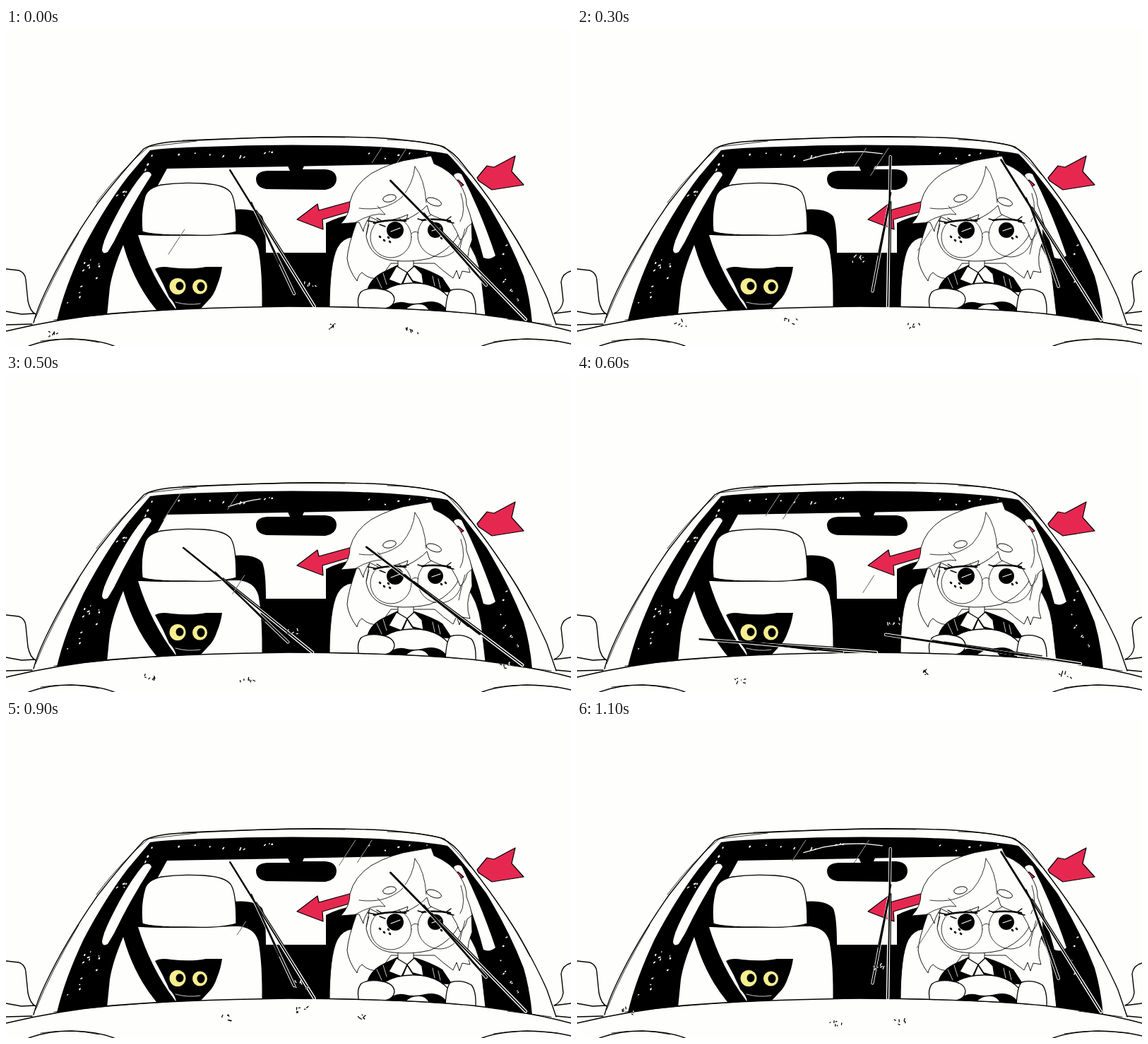
Animation, 800 px wide and 450 px high, one loop 1.2 s. Source, as an HTML page:

```html
<!DOCTYPE html>
<html lang="en">
<head>
<meta charset="utf-8">
<title>Rainy drive</title>
<style>
  html, body { margin: 0; width: 100%; height: 100%; overflow: hidden; background: #fefefc; }
  svg { display: block; width: 100vw; height: 100vh; }
  .ink { fill: none; stroke: #000; stroke-width: 1.4; stroke-linecap: round; stroke-linejoin: round; }
  .thin { stroke-width: .8; }
  .paper { fill: #fefefc; }
  .part { fill: #fefefc; stroke: #000; stroke-width: 1.3; stroke-linejoin: round; }
  .fine { stroke-width: .9; }
  .red { fill: #e62850; stroke: #000; stroke-width: 1.2; stroke-linejoin: round; }
  .yellow { fill: #f6ee8f; }
  #wipers { fill: none; stroke-linecap: round; stroke-linejoin: round; }
  #rain { mix-blend-mode: difference; fill: none; stroke: #fefefc; stroke-linecap: round; }
</style>
</head>
<body>
<svg viewBox="0 0 800 450" preserveAspectRatio="none">
  <rect class="paper" width="800" height="450"/>

  <!-- roof and door mirrors -->
  <path class="ink" d="M39 417Q44 398 56 373Q85 312 130 248Q165 203 195 171Q206 164 235 161Q300 157 400 154Q480 153 535 156Q590 160 616 167Q634 175 647 193Q691 248 724 301Q751 348 766 382L779 420"/>
  <path class="ink thin" d="M42 410Q63 357 103 290M128 247Q165 198 202 168L270 160M250 159Q390 153 480 155M540 158Q590 159 621 168L658 208M690 250Q722 296 742 335"/>
  <path class="ink" d="M0 341L18 343Q27 346 28 356L31 386Q34 401 42 405M0 401L22 405 41 404M0 420L37 419M800 344Q788 347 786 359L789 386Q787 399 776 404L800 401M779 419L800 421"/>

  <!-- windshield and rear window -->
  <path d="M72 414Q83 367 110 310Q140 253 172 211L204 173Q230 169 320 167Q400 164 500 167Q580 170 625 178Q638 189 680 245Q713 299 733 351Q742 382 745 417Z"/>
  <path class="paper" d="M228 199L400 196 600 192 600 318 225 318 212 228Z"/>
  <path class="paper" d="M195 205Q204 201 206 208Q176 254 153 302L144 317Q137 321 136 314Q137 303 150 277Q174 229 195 205Z"/>
  <path class="paper" d="M634 208Q639 203 645 207Q672 259 693 322Q685 329 676 325Q664 277 634 208Z"/>
  <path d="M320 257Q354 254 363 267Q368 279 368 318H453V276Q470 267 500 261V400H320Z"/>
  <path d="M398 193L402 202H370Q355 203 354 213Q354 226 369 228L452 229Q468 226 468 213Q467 201 452 200H420L423 193Z"/>

  <!-- arrow -->
  <path class="red" d="M412 271L441 249 443 258 490 245H520V250L448 271 449 285Q430 278 412 271Z"/>
  <path class="red" d="M628 219L640 215 648 222 634 230Z"/>
  <path class="red" d="M667 212L681 195 691 197 721 181 716 203 733 222 688 229 669 216Z"/>

  <!-- passenger seat -->
  <path class="paper" d="M166 307Q151 342 147 367L143 407H220Q183 367 166 307Z"/>
  <path class="part" d="M186 292Q230 295 326 291Q352 292 358 313Q364 346 363 400H241Q204 352 186 292Z"/>
  <path class="part" d="M193 288Q190 261 197 238Q201 226 220 222Q249 218 280 220Q312 222 319 234Q326 246 326 288Q304 295 255 293Q207 293 193 288Z"/>
  <path class="ink thin" d="M181 292L205 291M309 292L340 290 347 296M339 268Q345 277 344 287"/>

  <!-- cat -->
  <path d="M211 341Q219 336 234 339Q264 342 283 338L306 338Q304 352 299 364Q294 379 286 386L274 399H241Q240 390 231 381Q222 360 211 341Z"/>
  <path class="ink thin" style="stroke:#fefefc" d="M240 388Q258 393 275 390"/>
  <circle class="yellow" cx="243" cy="365.5" r="11.5"/>
  <circle class="yellow" cx="274.5" cy="366" r="10.5"/>
  <ellipse cx="246" cy="365" rx="5.5" ry="6"/>
  <ellipse cx="276" cy="366" rx="5.5" ry="6.5"/>

  <!-- driver's seat -->
  <path class="part fine" d="M458 400Q458 333 469 311Q477 297 490 296L650 299Q668 319 673 354L679 407Z"/>

  <!-- driver -->
  <path class="part fine" d="M497 273Q484 309 483 326Q485 342 497 358Q499 349 504 346Q515 357 530 354L545 333H607Q619 344 633 354L638 343 642 355 646 344 657 346Q649 326 660 300L659 274Z"/>
  <path d="M511 371Q516 353 536 344L555 335 579 336Q604 344 618 353L632 374Z"/>
  <path class="part fine" d="M555 325V338L567 348 577 338V325Z"/>
  <path class="part" d="M553 337L542 356 560 363 568 346ZM578 337L568 346 576 358 591 362 589 348Z"/>
  <path class="part" d="M568 347L561 364H579Z"/>
  <path d="M557 325H577V328H557Z"/>
  <path class="ink thin" style="stroke:#fefefc" d="M525 353L532 368M534 347L539 363M604 351L607 365M612 355L615 368"/>
  <path class="part fine" d="M510 295Q516 326 548 329Q574 332 600 326Q641 310 648 270L595 210 520 235Z"/>

  <!-- eyes and glasses -->
  <circle cx="551" cy="286" r="12"/>
  <circle cx="608" cy="286" r="11"/>
  <path class="ink" style="stroke:#fefefc;stroke-width:1.2" d="M545 288L558 283M603 287L615 283"/>
  <circle class="ink thin" cx="545" cy="296" r="29"/>
  <circle class="ink thin" cx="614" cy="293" r="31"/>
  <path class="ink thin" d="M574 291Q579 286 584 290"/>
  <path class="ink" style="stroke-width:2.6" d="M529 295l1 1M535 300l1 1M541 296l1 1M543 302l1 1M616 297l1 1M622 295l1 1"/>

  <!-- hair -->
  <path class="part fine" d="M487 246Q493 222 517 206Q547 189 578 185L602 181 606 192Q630 202 642 220Q653 237 652 250Q658 265 660 276L653 282Q651 294 643 300Q639 288 630 274Q612 270 600 263L596 251Q586 262 567 271L569 264Q549 273 529 274L515 267Q505 283 506 288L500 275 474 277Q487 264 487 246Z"/>
  <path class="ink thin" d="M579 196Q577 220 560 240Q536 260 500 255M579 196Q593 214 595 247M493 276Q521 260 537 264L526 252M644 234Q652 259 643 274M514 278L510 292M650 284Q644 304 641 320"/>
  <ellipse class="part fine" cx="543" cy="241" rx="9.5" ry="5" transform="rotate(-12 543 241)"/>
  <ellipse class="part fine" cx="606" cy="246" rx="11" ry="5" transform="rotate(20 606 246)"/>
  <path class="ink" style="stroke-width:2.6" d="M521 276Q543 270 566 273M589 272Q608 269 629 273"/>
  <path class="ink" d="M524 275L513 273M532 273L525 269M561 272L570 270M590 272L583 270M623 272L630 267M625 274L634 276M537 281L529 278"/>

  <!-- steering wheel and hands -->
  <path class="part" d="M516 397Q528 362 574 361Q620 360 638 398L632 407H516Z"/>
  <path d="M540 398Q548 386 563 388Q577 392 593 388Q615 383 626 401H540Z"/>
  <path class="paper" d="M566 399Q572 391 583 391Q594 390 599 400Z"/>
  <path class="part" d="M501 403Q495 382 503 373Q514 366 533 370Q549 373 550 384Q549 395 535 397L526 403Z"/>
  <path class="part" d="M622 407Q623 376 630 371Q645 367 659 375Q666 384 665 405Z"/>

  <g id="specks" class="paper"></g>

  <!-- hood -->
  <path class="paper" d="M0 429Q75 411 150 404Q250 396 400 394Q570 395 660 404Q745 414 800 429V450H0Z"/>
  <path class="ink" d="M0 429Q75 411 150 404Q250 396 400 394Q570 395 660 404Q745 414 800 429"/>
  <path class="ink thin" d="M68 413Q145 404 230 399M430 394Q565 396 645 403M710 412L772 420"/>
  <path class="ink" d="M32 450Q59 440 93 440Q130 441 153 450M674 450Q698 441 738 440Q777 441 800 447"/>
  <path class="ink thin" d="M49 443Q91 436 132 445M690 444Q730 437 781 443"/>

  <g id="wipers"></g>
  <g id="rain"></g>
</svg>
<script>
const STEP = 100, STEPS = 12, CYCLE = 9;
const byId = id => document.getElementById(id);
const mix = (a, b, t) => a + (b - a) * t;

function seeded(seed) {
  return () => {
    seed = (seed * 16807) % 2147483647;
    return seed / 2147483647;
  };
}

// How far the wipers are raised: quick rise, short hold, accelerating fall, rest
function sweep(beat) {
  const rise = (beat + 1) / 3, fall = (beat - 3) / 3;
  if (rise <= 1) return 1 - (1 - rise) ** 2.4;
  if (beat <= 3) return 1;
  return fall < 1 ? 1 - fall ** 1.26 : 0;
}

// A point at polar distance from a base, angle in degrees above the left horizon
function polar(base, angle, dist, side = 0) {
  const a = angle * Math.PI / 180, c = Math.cos(a), s = Math.sin(a);
  return [base[0] - c * dist + s * side, base[1] - s * dist - c * side];
}

const line = (...points) => 'M' + points.map(p => p.map(v => v.toFixed(1)).join(' ')).join('L');
const stroke = (d, color, width) => `<path d="${d}" stroke="${color}" stroke-width="${width}"/>`;

function wiper(base, angle, length, heel, bend, weight) {
  const at = (part, side = 0) => polar(base, angle, length * part, side);
  const tip = at(1), joint = at(.7);
  const blade = line(tip, joint, at(heel, bend)), arm = line(joint, base);
  const rough = line(at(.76, 2), at(.34, bend * .6 - 2)) + line(at(.7, 2), at(.2, 3));
  return stroke(arm, '#fefefc', 4.6) + stroke(blade, '#fefefc', weight + 1.8) +
    stroke(arm, '#000', 1.8) + stroke(blade, '#000', weight) + stroke(rough, '#000', 1.3);
}

function drawWipers(beat) {
  const s = sweep(beat), root = Math.sqrt(s);
  const left = [mix(424, 440, root), 394], right = [mix(713, 742, root), mix(410, 413, root)];
  const angle = mix(4.3, 91, s);
  let out = wiper(left, angle, 253 - .45 * angle, mix(.19, .1, s), mix(-3, -22, s), 2.4) +
    wiper(right, mix(8.5, 58, s ** .6), mix(279, 267, s * s), .27, -26 * s ** 3, 2.8);

  if (beat >= 2 && beat <= 5) {
    const arc = [0, .25, .5, .75, 1].map(t => {
      const a = 60 + 28 * s * t;
      return polar(left, a, 285 - .78 * a);
    });
    out += stroke(line(...arc), '#fefefc', 1.3);
  }
  byId('wipers').innerHTML = out;
}

function splash(x, y, rand) {
  let d = '';
  for (let i = 0; i < 6; i++) {
    d += `M${x + (rand() - .5) * 18} ${y + (rand() - .5) * 9}l${rand() * 5 - 2} ${rand() * 6 - 4}`;
  }
  return `<path d="${d}" stroke-width="1.3"/>`;
}

function drawRain(step) {
  const rand = seeded(911 + step * 5323);
  let out = '';
  for (let i = 0; i < 3; i++) out += splash(mix(60, 720, rand()), mix(410, 438, rand()), rand);
  out += splash(mix(370, 450, rand()), mix(325, 385, rand()), rand);
  for (let i = 0; i < 3; i++) {
    const x = mix(240, 570, rand()), y = i ? 170 : 285, len = mix(18, 40, rand());
    out += `<path d="M${x} ${y}l${-len * .65} ${len}" stroke-width=".8" opacity=".8"/>`;
  }
  byId('rain').innerHTML = out;
}

// Fixed white flecks scattered along the dark frame
function drawSpecks() {
  const rand = seeded(77);
  const scatter = (x1, y1, x2, y2, count, spread) => {
    let out = '';
    for (let i = 0; i < count; i++) {
      const t = rand(), x = mix(x1, x2, t) + (rand() - .5) * spread, y = mix(y1, y2, t) + (rand() - .5) * 10;
      out += `<ellipse cx="${x}" cy="${y}" rx="${.8 + rand() * 1.5}" ry="${.7 + rand() * .6}" transform="rotate(${-70 + rand() * 50} ${x} ${y})"/>`;
    }
    return out;
  };
  byId('specks').innerHTML = scatter(96, 392, 138, 305, 14, 24) + scatter(160, 240, 208, 183, 8, 8) +
    scatter(210, 180, 380, 179, 10, 4) + scatter(480, 180, 620, 182, 5, 4) + scatter(692, 275, 722, 393, 9, 16);
}

let shown = -1;
const start = performance.now();
function tick(now) {
  const step = Math.floor(Math.max(0, now - start) / STEP) % STEPS;
  if (step !== shown) {
    shown = step;
    drawWipers(step % CYCLE);
    drawRain(step);
  }
  requestAnimationFrame(tick);
}

drawSpecks();
tick(start);
</script>
</body>
</html>
```
